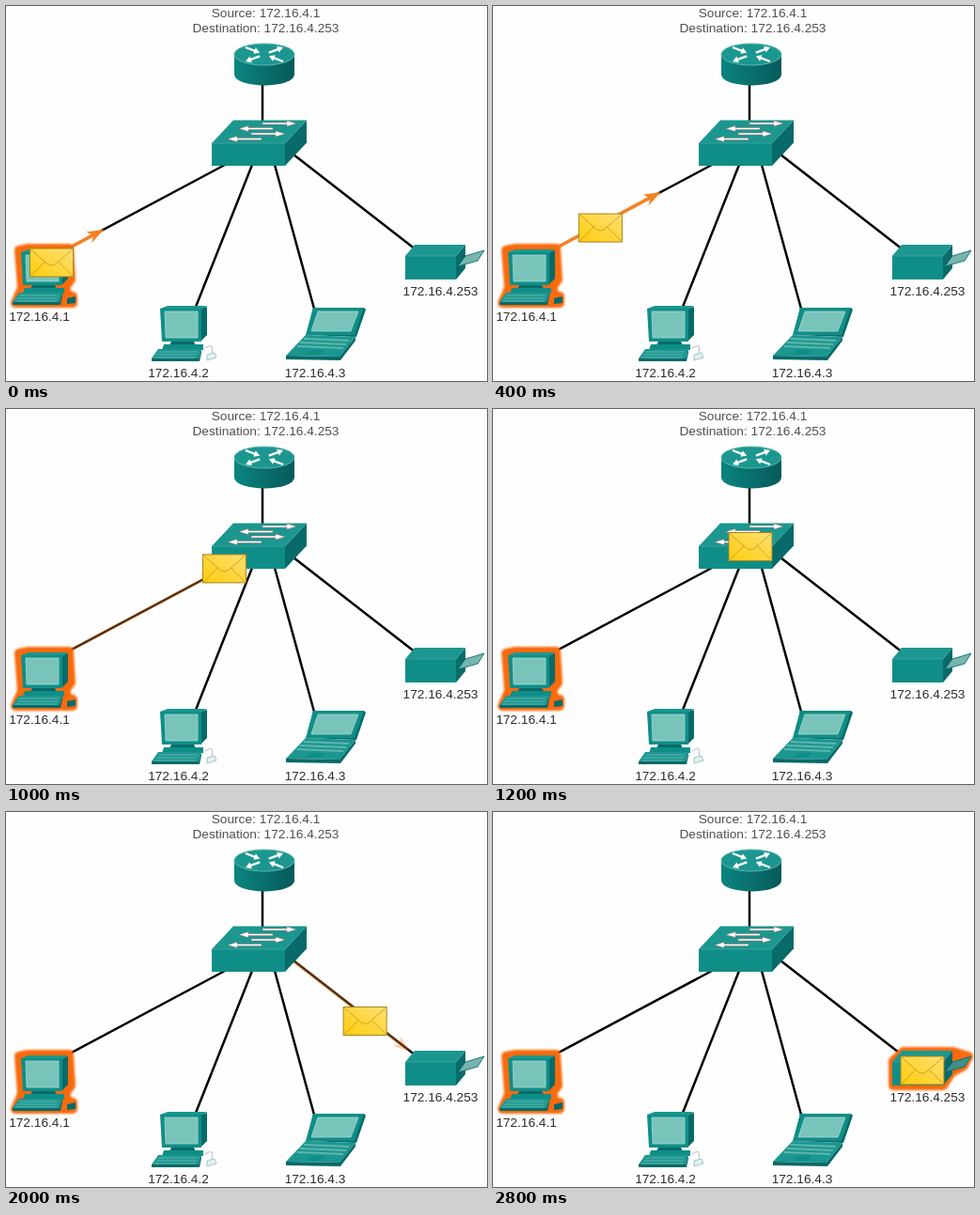
Animation of 512x399 px, one loop 3400 ms. Source, as an HTML page:

```html
<!DOCTYPE html>
<html lang="en">
<head>
<meta charset="utf-8">
<title>Unicast message</title>
<style>
  html, body { margin: 0; width: 100%; height: 100%; overflow: hidden; background: #fefefe; }
  svg { display: block; width: 512px; height: 399px; }
  text { font: 13.7px "Liberation Sans", Arial, sans-serif; text-anchor: middle; fill: #2c2c2c; }
  .title { fill: #505050; }
  .cable { stroke: #000; stroke-width: 2.5; }
  .front { fill: #0f8e87; }
  .top { fill: #1b9790; }
  .side { fill: #086a69; }
  .screen { fill: #79c4ba; stroke: #a5d8d1; stroke-width: .8; stroke-linejoin: round; }
  .edge { fill: none; stroke: #3fa59d; stroke-width: .8; }
  .keys { fill: none; stroke: #5fb5ad; }
  .glow { fill: #f96a08; stroke: #f96a08; stroke-width: 10; stroke-linejoin: round; filter: url(#soft); }
  .arrow { fill: #f58225; }
  .arrow line { stroke: #f58225; stroke-width: 3.6; }
</style>
</head>
<body>
<svg viewBox="0 0 512 399">
  <defs>
    <linearGradient id="drum">
      <stop offset="0" stop-color="#0a8580"/><stop offset="1" stop-color="#075a5b"/>
    </linearGradient>
    <linearGradient id="paper" y1="1" x2="1" y2="0">
      <stop offset="0" stop-color="#ffcc0a"/><stop offset="1" stop-color="#ffe074"/>
    </linearGradient>
    <filter id="soft" x="-20%" y="-20%" width="140%" height="140%"><feGaussianBlur stdDeviation="1"/></filter>

    <g id="computer">
      <path class="side" d="M59 262 L66 260 V290 L59 297Z"/>
      <path class="top" d="M16 262 L24 259 H66 L60 263Z"/>
      <path class="front" d="M16 262 H60 V297 H18Z"/>
      <path class="screen" d="M21 265 H56 V293 H22Z"/>
      <path class="side" d="M28 297 H52 L54 301 H26Z"/>
      <path class="front" d="M20 300 H62 V306 H18Z"/>
      <path class="top" d="M14 305 H60 L57 315 H7Z"/>
      <path class="side" d="M7 315 H57 L60 305 V309 L58 318 H7Z"/>
      <path class="keys" d="M14 308 H56 M12 311 H55 M10 314 H54"/>
    </g>
  </defs>

  <text class="title" x="276.5" y="12">Source: 172.16.4.1</text>
  <text class="title" x="276.5" y="28">Destination: 172.16.4.253</text>
  <text x="35.5" y="335">172.16.4.1</text>
  <text x="183.5" y="395">172.16.4.2</text>
  <text x="329" y="395">172.16.4.3</text>
  <text x="462.5" y="308">172.16.4.253</text>

  <path class="cable" d="M273 82 V124 M66 258 L233 169 M262 169 L202 320 M286 169 L328 322 M306 158 L436 259"/>
  <g id="arrows"></g>

  <!-- router -->
  <path fill="url(#drum)" d="M243 52 V73 A32 11.5 0 0 0 307 73 V52Z"/>
  <ellipse class="top" cx="275" cy="51.5" rx="32" ry="11.5" stroke="#5fb5ad"/>
  <g id="routerMarks" fill="#fff"></g>

  <g id="switch"></g>
  <g id="switchMarks" fill="#fff" stroke="#a86a66" stroke-width=".5"></g>

  <!-- sender -->
  <path class="glow" d="M14 260 L24 258 H67 L69 291 L63 299 L66 309 H71 V316 H10 L17 300Z"/>
  <use href="#computer"/>
  <path class="side" d="M65 311 L74 309 V316 L65 317Z"/>

  <!-- second computer -->
  <use href="#computer" x="148" y="60"/>
  <path d="M212 364 Q222 357 219 369" fill="none" stroke="#bbb"/>
  <path d="M214 371 L222 369 L224 374 L214 377Z" fill="#e4efed" stroke="#8bb" stroke-width=".8"/>

  <!-- laptop -->
  <path class="side" d="M327 321 H381 L383 323 L373 352 L320 350Z"/>
  <path class="front" d="M327 321 H381 L371 350 H319Z"/>
  <path class="screen" d="M332 325 H375 L367 346 H325Z"/>
  <path class="top" d="M319 350 L372 352 L355 373 L298 372Z"/>
  <path class="side" d="M298 372 L355 373 L372 352 V356 L356 377 L298 376Z"/>
  <path class="keys" stroke-width="2" d="M317 354 L365 356 M313 358 L362 360 M310 362 L359 364"/>
  <path class="front" d="M324 366 H339 L335 371 H319Z"/>

  <!-- printer -->
  <path id="target" class="glow" d="M426 265 L437 255 H489 L506 260 L501 270 L488 277 L479 291 H426Z"/>
  <g id="printer"></g>
  <path id="tray" d="M481 277 L489 266 L509 260 L502 271Z" stroke="#0a6f6d" stroke-width=".9"/>

  <g id="envelope">
    <rect x="-23" y="-15" width="46" height="30" fill="url(#paper)" stroke="#a3841c"/>
    <path d="M-22 -14 L-5 1 Q0 5 5 1 L22 -14 M-22 14 L-7 -1 M22 14 L7 -1" fill="none" stroke="#c0951c" stroke-width=".8"/>
  </g>
</svg>
<script>
const LOOP = 3400, STEP = 200, LAST = 2800;
const $ = id => document.getElementById(id);
const clamp = v => Math.min(1, Math.max(0, v));
const mix = (a, b, p) => a + (b - a) * p;

function make(tag, parent, attrs = {}) {
  const el = document.createElementNS("http://www.w3.org/2000/svg", tag);
  for (const name in attrs) el.setAttribute(name, attrs[name]);
  return parent.appendChild(el);
}

const place = (x, y, dx, dy) =>
  `translate(${x} ${y}) rotate(${Math.atan2(dy, dx) * 180 / Math.PI})`;

// Box seen from the front; its back is moved by dx to the right and dy up.
function box(parent, x, y, w, h, dx, dy) {
  make("path", parent, { class: "top", d: `M${x} ${y} l${dx} ${-dy} h${w} l${-dx} ${dy}Z` });
  make("path", parent, { class: "side", d: `M${x + w} ${y} l${dx} ${-dy} v${h} l${-dx} ${dy}Z` });
  make("rect", parent, { class: "front", x, y, width: w, height: h });
  make("path", parent, { class: "edge", d: `M${x} ${y} h${w} l${dx} ${-dy}` });
}
box($("switch"), 219, 146, 78, 24, 23, 24.5);
box($("printer"), 425, 266, 54, 25, 10, 12);

// Flat white arrow lying on a device.
function mark(parent, x, y, dx, dy, half, head, thick) {
  const length = Math.hypot(dx, dy), neck = length - head;
  make("path", parent, {
    d: `M0 ${-thick} H${neck} V${-half} L${length} 0 L${neck} ${half} V${thick} H0Z`,
    transform: place(x, y, dx, dy)
  });
}
for (const sx of [-1, 1]) for (const sy of [-1, 1]) {
  const inward = sx === sy, start = inward ? 1.25 : .3, run = inward ? -.95 : .95;
  mark($("routerMarks"), 275 + 16 * sx * start, 51.5 + 6 * sy * start, 16 * sx * run, 6 * sy * run, 3.5, 6, 1.2);
}
for (let i = 0; i < 4; i++) {
  const dir = i % 2 ? -1 : 1;
  mark($("switchMarks"), 281.5 + 9.5 * dir - 6 * i - 18 * dir, 125 + 5.5 * i, 36 * dir, 0, 3, 10, 1);
}

// Arrow that grows along a cable from begin to end, then fades out.
function pointer([x, y], [toX, toY], begin, end, gone) {
  const dx = toX - x, dy = toY - y;
  const group = make("g", $("arrows"), { class: "arrow", transform: place(x, y, dx, dy) });
  const line = make("line", group);
  const head = make("path", group, { d: "M0 0 L-18 -6.5 L-13 0 L-18 6.5Z" });
  return t => {
    const length = Math.hypot(dx, dy) * clamp((t - begin) / (end - begin));
    line.setAttribute("x2", Math.max(0, length - 12));
    head.setAttribute("transform", `translate(${length} 0)`);
    group.setAttribute("opacity", t > begin ? clamp((gone - t) / 450) : 0);
  };
}
const pointers = [
  pointer([67, 257.5], [225, 173.3], -200, 650, 1160),
  pointer([305, 158], [430, 255], 1200, 1680, 2160)
];

// The envelope gathers speed up to the switch and loses a little on the way down.
function envelopeAt(t) {
  const start = [48.5, 273], hub = [274, 146.5], end = [457, 275];
  const climbing = t < 1200;
  const [from, to] = climbing ? [start, hub] : [hub, end];
  const p = climbing ? (t / 1200) ** 1.12 : clamp((t - 1200) / 1400) ** .94;
  return from.map((v, i) => mix(v, to[i], p));
}

function draw(now) {
  const t = Math.min(LAST, Math.floor(now % LOOP / STEP) * STEP);
  const glow = clamp((t - 2400) / 400);
  $("envelope").setAttribute("transform", `translate(${envelopeAt(t)})`);
  $("target").setAttribute("opacity", glow);
  $("tray").setAttribute("fill", glow ? "#3f8f8b" : "#78b5b0");
  pointers.forEach(update => update(t));
}

function tick() {
  draw(performance.now());
  requestAnimationFrame(tick);
}
tick();
</script>
</body>
</html>
```
